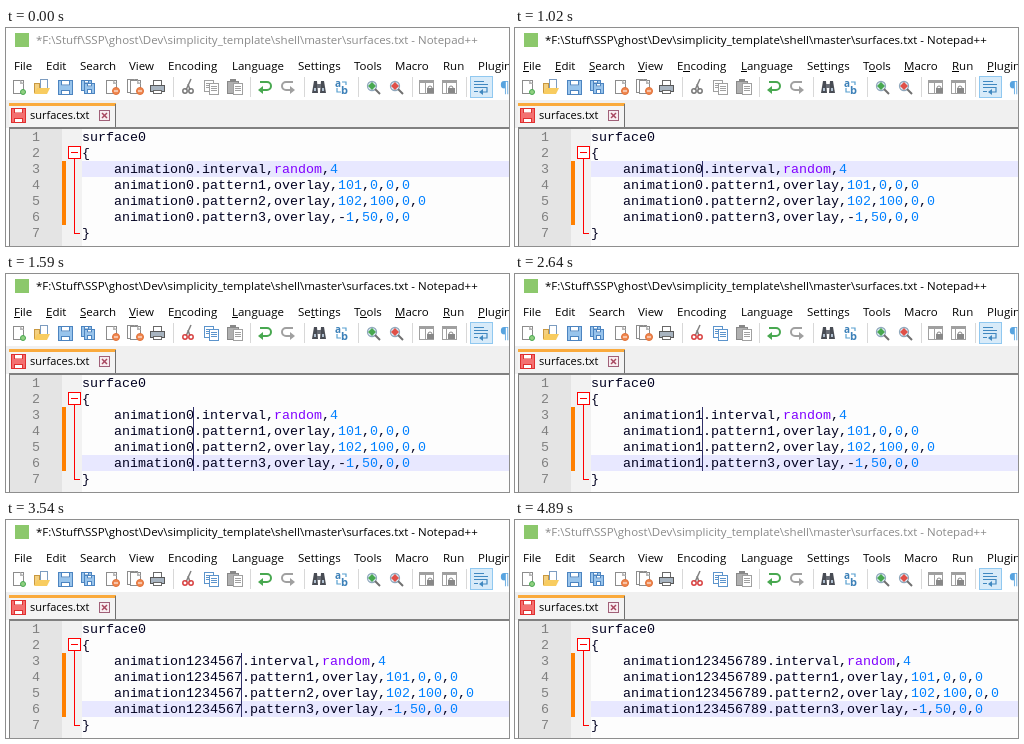
An HTML page with a canvas that plays this animation: 503x218 px, repeating every 4950 ms.

```html
<!DOCTYPE html>
<html lang="en">
<head>
<meta charset="utf-8">
<title>Column editing</title>
<style>
html, body { margin: 0; width: 503px; height: 218px; overflow: hidden; background: #fff }
canvas { display: block }
</style>
</head>
<body>
<canvas id="stage" width="503" height="218"></canvas>
<script>
const g = document.getElementById('stage').getContext('2d');
const UI = '11.5px "Open Sans", "Noto Sans", sans-serif';
const MONO = '13.33px "Liberation Mono", monospace';
const LOOP = 4950, CHAR = 8, ROW = 16, TEXT_X = 76, TEXT_Y = 101;
const INK = '#000020', GREEN = '#48a850', GREY = '#a0a0a0', RED = '#f00';

const MENU = [
  // label, x, index of the mnemonic letter
  ['File', 8, 0], ['Edit', 40, 0], ['Search', 74, 0], ['View', 123, 0],
  ['Encoding', 162, 1], ['Language', 226, 0], ['Settings', 292, 2],
  ['Tools', 348, 1], ['Macro', 389, 0], ['Run', 437, 0], ['Plugins', 472, 0]
];
const KEY_TIMES = [2640, 2790, 2940, 3090, 3240, 3390, 3540, 3720, 3870];
const SELECT_TIMES = [1290, 1440, 1590];

const ramp = (t, a, b) => Math.min(1, Math.max(0, (t - a) / (b - a)));
const passed = (times, t) => times.filter(k => t >= k).length;
const rowY = n => TEXT_Y + (n - 1) * ROW;

function rect(x, y, w, h, fill, stroke) {
  if (fill) { g.fillStyle = fill; g.fillRect(x, y, w, h); }
  if (stroke) {
    g.strokeStyle = stroke; g.lineWidth = 1;
    g.strokeRect(x + .5, y + .5, w - 1, h - 1);
  }
}

function line(color, width, ...pts) {
  g.strokeStyle = color; g.lineWidth = width;
  g.beginPath();
  for (let i = 0; i < pts.length; i += 2) g.lineTo(pts[i], pts[i + 1]);
  g.stroke();
}

function ring(x, y, r, color, width = 1, fill, from = 0, to = 2 * Math.PI) {
  g.beginPath(); g.arc(x, y, r, from, to);
  if (fill) { g.fillStyle = fill; g.fill(); }
  g.strokeStyle = color; g.lineWidth = width; g.stroke();
}

function poly(fill, ...pts) {
  g.fillStyle = fill;
  g.beginPath();
  for (let i = 0; i < pts.length; i += 2) g.lineTo(pts[i], pts[i + 1]);
  g.fill();
}

function text(s, x, y, color, font = UI) {
  g.font = font; g.fillStyle = color;
  g.fillText(s, x, y);
}

// Toolbar icons, each drawn around 0,0
const page = (x = 0, y = 0) => {
  rect(x - 6, y - 7, 11, 14, '#fff', '#8c8c8c');
  poly('#b8b8b8', x + 1, y - 7, x + 5, y - 3, x + 1, y - 3);
};
const sheet = (x, y, color) => {
  rect(x, y, 10, 12, '#fff', color);
  for (let i = 3; i < 9; i += 2) rect(x + 2, y + i, 6, 1, color);
};
const floppy = (x, y, s, color, tint) => {
  rect(x, y, s, s, tint, color);
  rect(x + 3, y, s - 6, s / 2 - 2, '#fff', color);
  rect(x + 3, y + s - 5, s - 6, 5, '#fff', color);
};
const blueFloppy = (x, y, s) => floppy(x, y, s, '#4c84c0', '#98c4ec');
const closer = x => {
  page(x);
  ring(x + 4, 4, 3.5, '#e07038', 1, '#f08850');
  rect(x + 2, 3.5, 4, 1, '#fff');
};
const turn = (dir, color) => {
  g.scale(dir, 1);
  line(color, 2, -5, -5, 2, -5);
  ring(2, -1, 4, color, 2, null, -Math.PI / 2, Math.PI / 2);
  line(color, 2, 2, 3, -3, 3);
  poly(color, -7, 3, -2, -1, -2, 7);
};
const zoom = color => {
  ring(-1, -1, 4.5, '#90a8bc', 1.3, '#e4f0fa');
  line('#707070', 2, 2, 2, 7, 7);
  poly(color, -5, -1, -1, -5, 3, -1, -1, 3);
};
const lock = x => {
  rect(-8, -7, 15, 14, '#fff', GREY);
  rect(-8, -7, 15, 3, GREY);
  rect(x - 4, -4, 1, 10, GREY);
  ring(x + 1, 1, 2, '#888', 1);
  rect(x - 2, 1, 7, 5, '#888');
};

const ICONS = [
  [13, () => { page(); ring(4, 5, 2.5, GREEN, 1, '#90d080'); }],
  [36, () => {
    rect(-2, -8, 8, 10, '#fff', '#7c9cc0');
    rect(-8, -4, 6, 10, '#f4d080', '#c89840');
    poly('#f8cc60', -5, 1, 8, 1, 5, 7, -8, 7);
  }],
  [59, () => blueFloppy(-7, -7, 15)],
  [82, () => { blueFloppy(-7, -7, 11); blueFloppy(-4, -4, 11); }],
  [105, () => closer(1)],
  [128, () => { page(-1, -1); closer(2); }],
  [151, () => {
    rect(-4, -7, 9, 6, '#fff', '#686868'); rect(-7, -2, 15, 7, '#a8b4c0', '#585858');
    rect(-4, 3, 9, 4, '#fff', '#686868');
  }],
  [182, on => {
    const handle = on ? '#d84040' : '#787878';
    line('#808080', 1.5, 3, -8, -2, 3); line('#808080', 1.5, 0, -3, 2, 3);
    ring(-3, 4, 2.2, handle, 1.5); ring(3, 4, 2.2, handle, 1.5);
  }],
  [205, on => {
    const color = on ? '#5c94cc' : GREY;
    sheet(-7, -7, color); sheet(-2, -4, color);
  }],
  [228, () => {
    rect(-7, -6, 12, 13, '#b0b0b0', '#888'); rect(-4, -8, 6, 3, '#888');
    sheet(-1, -4, GREY);
  }],
  [259, () => turn(1, GREEN)],
  [282, () => turn(-1, GREY)],
  [313, () => {
    for (const side of [-1, 1]) {
      poly('#484c54', side * 7, 6, side * 5, -6, side * 2, -6, side, 6);
      rect(side * 4 - 1, 1, 2, 3, '#b0c0d0');
    }
    rect(-2, -3, 4, 4, '#686c74');
  }],
  [336, () => {
    text('a', -7, 0, '#3c80b8', 'bold 10px "Open Sans", sans-serif');
    text('b', -1, 7, '#3c80b8', 'bold 11px "Open Sans", sans-serif');
    line('#58a0d0', 1.2, -5, 1, -5, 5, -1, 5);
    line('#58a0d0', 1.2, 0, -5, 4, -5, 4, -2);
  }],
  [367, () => zoom(GREEN)],
  [390, () => zoom('#e05048')],
  [421, () => lock(2)],
  [444, () => lock(0)],
  [475, () => {
    rect(-11, -11, 23, 22, '#d8ebf9', '#90c8f0');
    rect(-7, -6, 10, 1, '#4088c0'); rect(-7, -3, 14, 1, '#4088c0');
    line('#4088c0', 1.2, -7, .5, 6, .5, 6, 5, 1, 5);
    poly('#4088c0', -2, 5, 2, 2, 2, 8);
    rect(-7, 4, 4, 1, '#4088c0');
  }],
  [498, () => text('¶', -4, 5, '#58a4e0', '15px "Open Sans", sans-serif')]
];

function drawWindow(active, underline, selected) {
  rect(0, 0, 503, 218, '#fff');

  // Title bar; the program mark is a plain square
  rect(9, 5, 14, 14, '#8cc86c');
  const shade = Math.round(138 * (1 - active));
  text('*F:\\Stuff\\SSP\\ghost\\Dev\\simplicity_template\\shell\\master\\surfaces.txt - Notepad++',
    30, 16, `rgb(${shade},${shade},${shade})`);

  for (const [label, x, key] of MENU) {
    text(label, x, 42, '#000');
    if (!underline) continue;
    const from = g.measureText(label.slice(0, key)).width;
    g.globalAlpha = underline;
    rect(Math.round(x + from), 43, Math.round(g.measureText(label[key]).width), 1, '#000');
    g.globalAlpha = 1;
  }

  for (const x of [167, 244, 298, 352, 406, 460]) rect(x, 49, 1, 20, '#d8d8d8');
  for (const [x, draw] of ICONS) {
    g.save(); g.translate(x, 59); draw(selected); g.restore();
  }

  // Tab strip
  rect(0, 72, 503, 28, '#f0f0f0');
  rect(3, 75, 107, 25, '#f4f4f4');
  rect(3, 75, 107, 3, '#faaa3c');
  rect(109, 76, 1, 23, '#707070');
  floppy(5, 80, 15, '#e03030', '#f47070');
  text('surfaces.txt', 24, 91, '#000', UI.replace('11.5', '11'));
  rect(93, 82, 11, 11, '#f8ecf0', '#a06078');
  line('#a84860', 1.5, 96, 85, 101, 90);
  line('#a84860', 1.5, 101, 85, 96, 90);
}

function drawEditor(id, current, carets) {
  rect(3, 99, 500, 119, '#808080');
  rect(4, 101, 499, 117, '#fdfdfd');
  rect(4, 101, 52, 117, '#e4e4e4');
  rect(56, 101, 20, 117, '#f2f2f2');
  rect(56, rowY(3), 4, 4 * ROW, '#ff8000');
  rect(TEXT_X, rowY(current), 427, ROW, '#e8e8ff');

  // Fold marker
  rect(68, 130, 1, 76, RED);
  rect(68, 205, 6, 1, RED);
  rect(62, 118, 13, 13, '#fff', RED);
  rect(65, 124, 7, 1, RED);

  const head = '    animation' + id;
  const lines = [
    'surface0', '{',
    head + '.interval,random,4',
    head + '.pattern1,overlay,101,0,0,0',
    head + '.pattern2,overlay,102,100,0,0',
    head + '.pattern3,overlay,-1,50,0,0',
    '}'
  ];
  lines.forEach((s, i) => {
    const y = rowY(i + 1) + 12;
    text(i + 1, 26, y, '#808080', MONO);
    let col = 0;
    for (const part of s.split(/(random|\b\d+\b)/)) {
      const color = part === 'random' ? '#8000ff' : /^\d/.test(part) ? '#0080ff' : INK;
      text(part, TEXT_X + col * CHAR, y, color, MONO);
      col += part.length;
    }
  });

  if (carets) rect(TEXT_X + head.length * CHAR - 1, rowY(3), 1, (current - 2) * ROW, '#303068');
}

function drawPointer(t) {
  if (t < 30 || t >= 720) return;
  const p = ramp(t, 30, 540), ease = p * p * (3 - 2 * p);
  let x = Math.round(465 - 267 * ease), y = Math.round(39 + 107 * ease);
  if (t >= 570) { x = 190; y = 145; }
  if (y < 100) {
    g.save(); g.translate(x, y);
    poly('#000', 0, 0, 12, 12, 7, 12, 10, 18, 7, 19, 4, 13, 0, 17);
    poly('#fff', 1, 2.5, 9.5, 11, 5.5, 11, 8.5, 17.5, 7.5, 18, 4.5, 11.5, 1, 14.8);
    g.restore();
  } else {
    rect(x, y - 8, 1, 16, '#000');
    for (const end of [y - 9, y + 8]) {
      rect(x - 3, end, 3, 1, '#000');
      rect(x + 1, end, 3, 1, '#000');
    }
  }
}

function draw(now) {
  const t = Math.floor(now % LOOP / 30) * 30;
  const active = t < 4890 ? ramp(t, 690, 900) : 0;
  const underline = ramp(t, 960, 1020) - ramp(t, 1710, 1770);
  const id = t < 2220 ? '0' : '123456789'.slice(0, passed(KEY_TIMES, t));
  const rows = passed(SELECT_TIMES, t);
  const carets = t >= 780 && t < 2130 || t >= 2220 && t < 4440;

  drawWindow(active, underline, rows > 0);
  drawEditor(id, 3 + rows, carets);
  drawPointer(t);
}

const start = performance.now();
(function tick() {
  draw(performance.now() - start);
  requestAnimationFrame(tick);
})();
</script>
</body>
</html>
```
